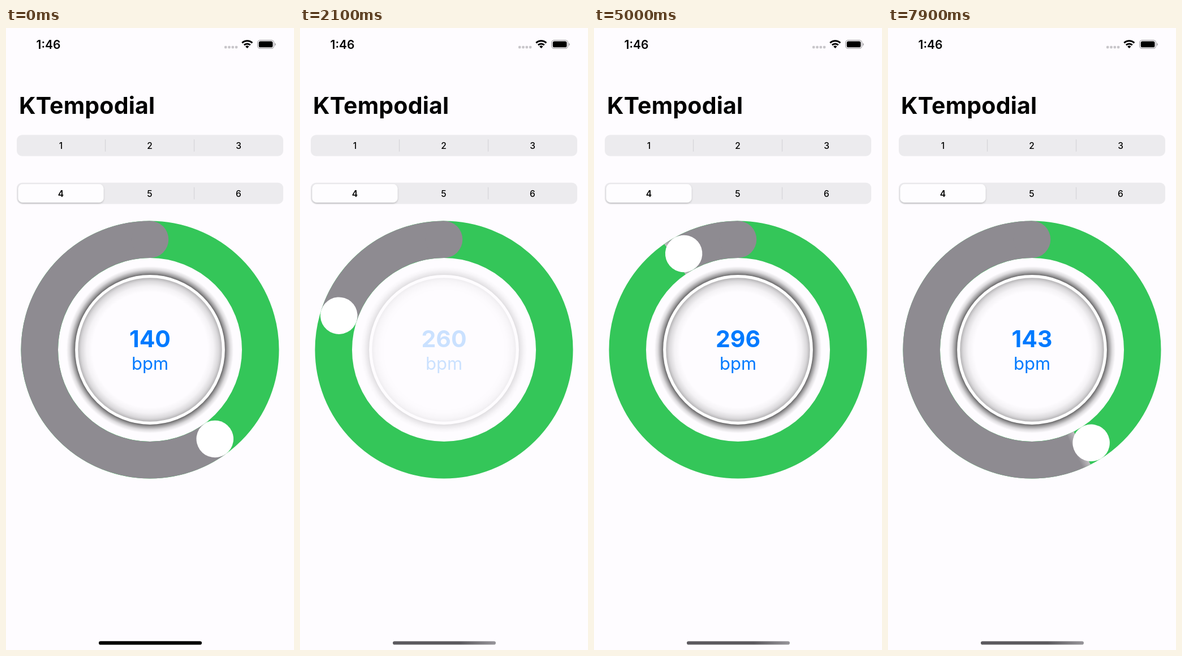
Animation of 509x1101 px, one loop 8 s. Source, as an HTML page:

```html
<!DOCTYPE html>
<html lang="en">
<head>
<meta charset="utf-8">
<title>Metronome dial</title>
<style>
  html, body { margin: 0; width: 100%; height: 100%; overflow: hidden; background: #fefcff; }
  svg { display: block; width: 100vw; height: 100vh; }
  text { font-family: Inter, Roboto, sans-serif; }
  .seg { font-size: 15.5px; font-weight: 500; text-anchor: middle; }
  .dial { fill: #007aff; text-anchor: middle; }
</style>
</head>
<body>
<svg viewBox="0 0 509 1101">
  <defs>
    <radialGradient id="glow" gradientUnits="userSpaceOnUse" cx="0" cy="0" r="150">
      <stop offset=".68" stop-color="#000" stop-opacity="0"/>
      <stop offset=".75" stop-color="#000" stop-opacity=".04"/>
      <stop offset=".81" stop-color="#000" stop-opacity=".14"/>
      <stop offset=".85" stop-color="#000" stop-opacity=".29"/>
      <stop offset=".88" stop-color="#000" stop-opacity=".6"/>
      <stop offset=".91" stop-color="#000" stop-opacity=".36"/>
      <stop offset=".945" stop-color="#000" stop-opacity=".13"/>
      <stop offset=".985" stop-color="#000" stop-opacity="0"/>
    </radialGradient>
    <linearGradient id="sheen" gradientUnits="userSpaceOnUse" x1="0" y1="0" x2="15" y2="0">
      <stop offset="0" stop-color="#fff" stop-opacity=".45"/>
      <stop offset="1" stop-color="#fff" stop-opacity="0"/>
    </linearGradient>
    <linearGradient id="dim">
      <stop offset="0" stop-color="#5c5a5f"/>
      <stop offset=".65" stop-color="#5c5a5f"/>
      <stop offset="1" stop-color="#98969b"/>
    </linearGradient>
    <filter id="lift" x="-10%" y="-20%" width="120%" height="150%">
      <feDropShadow dx="0" dy="1.5" stdDeviation="1.6" flood-color="#000" flood-opacity=".22"/>
    </filter>
  </defs>

  <rect width="509" height="1101" fill="#fefcff"/>

  <text x="53.5" y="36.5" font-size="21" font-weight="600">1:46</text>
  <g id="signal" fill="#c8c6ca"></g>
  <g id="wifi" fill="none" stroke="#000"></g>
  <rect x="444.6" y="21.6" width="29" height="14.6" rx="4.6" fill="none" stroke="#a3a1a5" stroke-width="1.2"/>
  <rect x="446.7" y="23.5" width="24.8" height="10.8" rx="2.9"/>
  <path d="M475.2 26.4q1.8 .8 1.8 2.5t-1.8 2.5z" fill="#a3a1a5"/>

  <text x="23" y="152" font-size="41" font-weight="700" letter-spacing=".2">KTempodial</text>
  <g id="bars"></g>

  <g transform="translate(254.5 569.5)">
    <circle r="195.25" fill="none" stroke="#34c659" stroke-width="65.5"/>
    <path id="rest" fill="none" stroke="#8e8b91" stroke-width="65.5"/>
    <circle cy="-195.25" r="32.75" fill="#8e8b91"/>
    <path id="edge" fill="none" stroke="url(#sheen)" stroke-width="65.5"/>
    <circle id="knob" cy="-195.25" r="32.75" fill="#fff"/>
    <g id="dial">
      <circle r="150" fill="url(#glow)"/>
      <circle r="129.8" fill="none" stroke="#fff" stroke-width="5.2"/>
      <text id="count" class="dial" y="-4.5" font-size="41" font-weight="700"></text>
      <text class="dial" y="35.5" font-size="31">bpm</text>
    </g>
  </g>

  <rect x="164" y="1085.4" width="182" height="6.2" rx="3.1" fill="url(#dim)"/>
  <rect id="home" x="164" y="1085.4" width="182" height="6.2" rx="3.1"/>
</svg>
<script>
const LOOP = 8000, STEP = 100, R = 195.25;
const $ = id => document.getElementById(id);
const clamp = v => Math.max(0, Math.min(1, v));
const degrees = bpm => 1.2 * (bpm - 20);

// time in ms, knob bpm, trailing ring bpm
const keys = [
  [0, 140, 140], [400, 140, 140], [500, 149.3, 140], [1000, 196, 186.7],
  [1300, 224, 215], [1700, 253, 246], [1800, 260, 260], [4200, 260, 260],
  [4300, 266, 260.6], [5000, 295.5, 291], [5100, 300, 296], [5400, 309, 306],
  [5500, 311, 311], [6300, 311, 311], [6400, 300, 301], [7100, 207, 207],
  [7200, 198, 200], [7300, 189.6, 198], [7800, 147.6, 156], [7900, 143, 147.5]
];

function pose(t) {
  const i = keys.findIndex(k => k[0] > t);
  if (i < 0) return keys[keys.length - 1].slice(1);
  const a = keys[i - 1], b = keys[i], p = (t - a[0]) / (b[0] - a[0]);
  return [1, 2].map(n => a[n] + (b[n] - a[n]) * p);
}

function point(deg, r = R) {
  const a = deg * Math.PI / 180;
  return `${(r * Math.sin(a)).toFixed(2)} ${(-r * Math.cos(a)).toFixed(2)}`;
}

function arc(from, to, r = R) {
  return `M${point(from, r)}A${r} ${r} 0 ${to - from > 180 ? 1 : 0} 1 ${point(to, r)}`;
}

function bar(y, first, picked) {
  let s = `<rect x="19" y="${y}" width="471" height="37.6" rx="9.5" fill="#ecebee"/>`;
  for (const x of picked ? [332.5] : [175.5, 332.5])
    s += `<rect x="${x - .6}" y="${y + 8}" width="1.3" height="21.5" fill="#d7d5da"/>`;
  if (picked)
    s += `<rect x="21.5" y="${y + 2.5}" width="151" height="32.6" rx="8" fill="#fefdff" filter="url(#lift)"/>`;
  for (let i = 0; i < 3; i++)
    s += `<text class="seg" x="${97 + 157 * i}" y="${y + 24.8}"${picked && !i ? ' style="font-weight:600"' : ''}>${first + i}</text>`;
  return s;
}

$('bars').innerHTML = bar(189.2, 1, false) + bar(273.8, 4, true);
$('signal').innerHTML = [0, 1, 2, 3].map(i =>
  `<rect x="${386 + i * 6.3}" y="31.8" width="4.4" height="4.4" rx="1.4"/>`).join('');
$('wifi').innerHTML = [[13.2, 3], [8, 2.9], [2.3, 4.6]].map(([r, w]) =>
  `<path transform="translate(426.3 36)" d="${arc(-43, 43, r)}" stroke-width="${w}"/>`).join('');
$('edge').setAttribute('d', arc(0, 4.5));

function draw(t) {
  const [bpm, tail] = pose(t), end = degrees(tail);
  $('rest').setAttribute('d', arc(end, 360));
  $('edge').setAttribute('transform', `rotate(${end})`);
  $('edge').setAttribute('opacity', clamp(Math.abs(bpm - tail) / 3 - .4));
  $('knob').setAttribute('transform', `rotate(${degrees(bpm)})`);
  $('count').textContent = Math.round(bpm);

  const p = clamp((t - 2200) / 600);
  $('dial').setAttribute('opacity', t < 2100 ? 1 : .2 + .8 * p * p * (3 - 2 * p));
  $('home').setAttribute('opacity', 1 - clamp((t - 400) / 400));
}

function tick() {
  const t = performance.now() % LOOP;
  draw(Math.floor(t / STEP) * STEP);
  requestAnimationFrame(tick);
}
tick();
</script>
</body>
</html>
```
